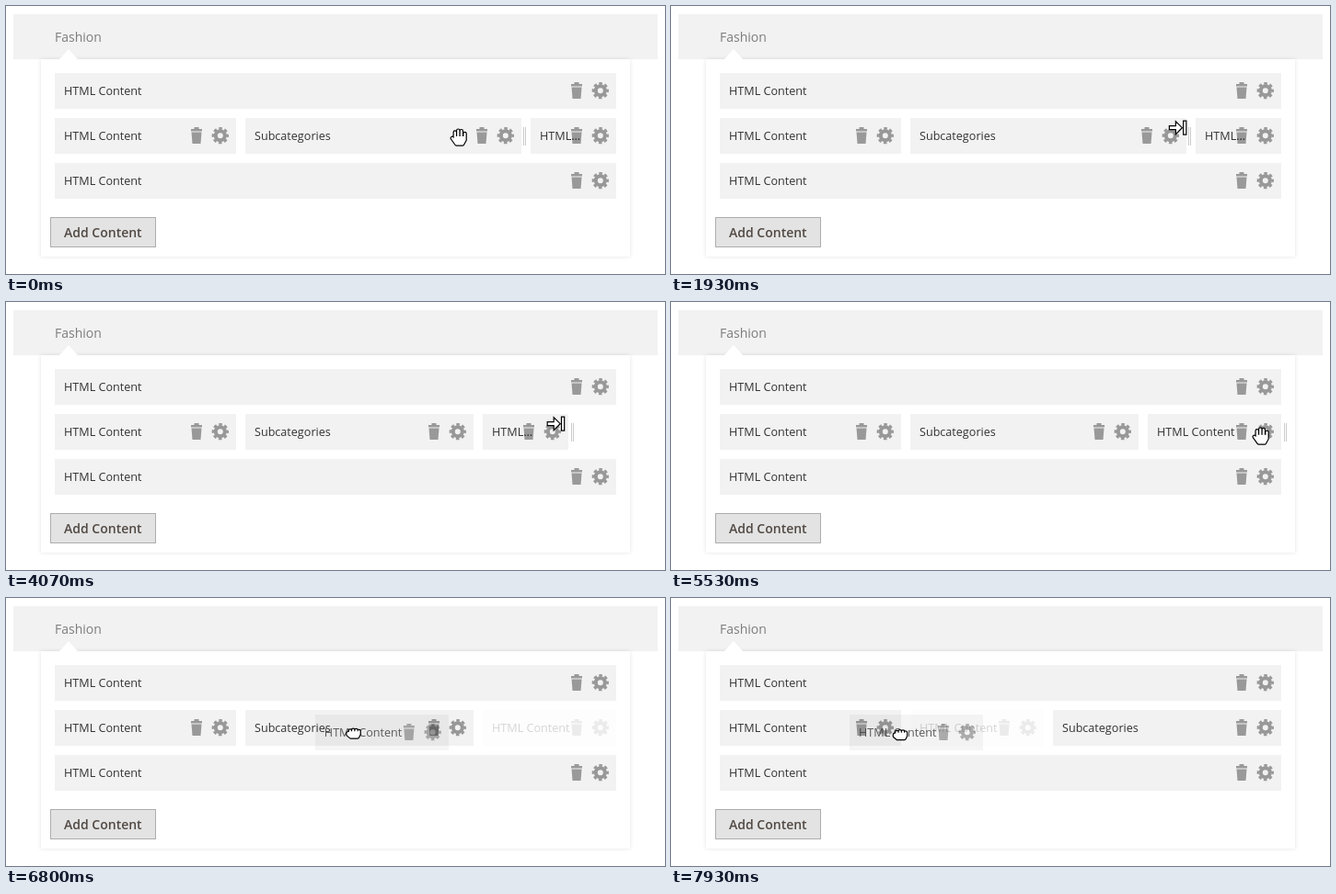
An HTML page that plays this animation: 716 px wide and 292 px high, repeating every 8000 ms.

```html
<!DOCTYPE html>
<html lang="en">
<head>
<meta charset="utf-8">
<title>Menu layout editor</title>
<style>
  html, body { margin: 0; width: 100%; height: 100%; overflow: hidden; background: #fff; }
  svg { display: block; }
  text { font: 12.6px "Open Sans", sans-serif; fill: #333; white-space: pre; }
  rect { shape-rendering: crispEdges; }
  .panel { fill: #fff; filter: drop-shadow(0 0 2px rgba(0, 0, 0, .11)); }
  .tab { font-size: 14px; fill: #7d7d7d; }
  .button { fill: #e3e3e3; stroke: #adadad; }
  .add { font-size: 14px; font-weight: 600; fill: #514943; }
  .box { fill: rgba(0, 0, 0, .05); }
  .icon { opacity: .37; }
  .ring { fill: none; stroke: #000; }
  .handle { stroke: #ccc; shape-rendering: crispEdges; }
  .helper { fill: none; stroke: #aaa; stroke-dasharray: 1 1; }
  .outer, .inner { stroke-linejoin: round; stroke-linecap: round; }
  .outer { fill: #000; stroke: #000; stroke-width: 4.6; }
  .inner { fill: #fff; stroke: #fff; stroke-width: 2.2; }
  .arrow { fill: #fff; stroke: #000; stroke-width: 1.2; }
</style>
</head>
<body>
<svg width="716" height="292">
  <defs>
    <path id="trash" d="M-2.5-9h5v2h3.5v2.5h-12v-2.5h3.5zM-5.5-3.5H5.5L4.5 9H-4.5z"/>
    <g id="gear" class="ring">
      <circle r="5" stroke-width="4"/>
      <circle r="7.75" stroke-width="2.8" stroke-dasharray="3.5 2.587" stroke-dashoffset="1.75"/>
    </g>
    <path id="open" d="M-4.2 0V-5.5M-.7 0V-7.3M2.8 0V-6.8M6.5 1V-4M-7.2 1L-5 4M-4.2 0H6.5V3L4 7.5H-2.5L-5 4z"/>
    <path id="closed" d="M-3.6-1V-2.8M-.3-1V-3.6M3-1V-3.3M6-1V-2.2M-3.6-1H6V1L4.5 4H-3L-6 1.5V0z"/>
    <path id="arrow" class="arrow" d="M-9.5-2H-2.5V-7L4.5 0L-2.5 7V2H-9.5zM5.8-7.5h3.2v15h-3.2z"/>
  </defs>
  <rect x="8" y="9" width="700" height="49" fill="#f2f2f2"/>
  <rect class="panel" x="38" y="58" width="640" height="215"/>
  <path d="M58 58L68 47L78 58z" fill="#fff"/>
  <text class="tab" x="53" y="39">Fashion</text>
  <rect class="button" x="48.5" y="230.5" width="114" height="32"/>
  <text class="add" x="63" y="252">Add Content</text>
  <g id="scene"></g>
</svg>
<script>
const scene = document.getElementById('scene');
const LOOP = 8000, FPS = 15, STEPS = LOOP / 1000 * FPS;
const ROWS = [73, 122, 171];
const HTML = 'HTML Content', SUB = 'Subcategories';

// Steps at which the layout or the cursor changes.
const GRAB_1 = 30, DROP_1 = 45, HOVER = 51, GRAB_2 = 69, DROP_2 = 79, DRAG = 92, SWAP = 118;
const EDGE_1 = 15, EDGE_2 = 61;

// Pointer moves: [first step, last step, x reached].
const MOVES = [
  [6, 16, 567], [28, 36, 522], [50, 62, 616], [68, 73, 667],
  [79, 83, 641], [83, 89, 573], [91, 104, 342], [104, 118, 249]
];

const within = (k, from, to) => k >= from && k < to;
const clamp = v => Math.max(0, Math.min(1, v));
const edge = col => 48 + col * 620 / 12;

const pointerX = k => MOVES.reduce((x, [from, to, goal]) => x + (goal - x) * clamp((k - from) / (to - from)), 492);
const pointerY = k => 143 + 6 * (k / STEPS) ** 2;

const use = (id, x, y, cls = '') => `<use href="#${id}" x="${x}" y="${y}" class="${cls}"/>`;

function box(label, left, right, y, opacity = 1) {
  return `<g opacity="${opacity}">
    <rect class="box" x="${left}" y="${y}" width="${right - left}" height="39"/>
    <text x="${left + 10}" y="${y + 24}">${label}</text>
    ${use('trash', right - 43, y + 19, 'icon')}${use('gear', right - 17.2, y + 19.2, 'icon')}</g>`;
}

// An item that fills grid columns from..to, less the gutter.
const item = (label, from, to, row = 1, opacity = 1) =>
  box(label, Math.round(edge(from) + 5), Math.round(edge(to) - 5), ROWS[row], opacity);

function middleRow(k) {
  const first = item(HTML, 0, 4);
  if (k >= SWAP) return first + item(HTML, 4, 7, 1, .2) + item(SUB, 7, 12);
  const split = k < DROP_1 ? 10 : 9;
  const end = within(k, DROP_1, DROP_2) ? 11 : 12;
  return first + item(SUB, 4, split) + item(end - split < 3 ? 'HTML…' : HTML, split, end, 1, k < DRAG ? 1 : .2);
}

function handle(k) {
  if (within(k, DROP_1, HOVER) || k >= DRAG) return '';
  const col = k < DROP_1 ? 10 : k < DROP_2 ? 11 : 12;
  return `<path class="handle" d="M${Math.floor(edge(col)) - 1.5} 132v20m2 0v-20"/>`;
}

function helper(k, x) {
  const col = within(k, GRAB_1, DROP_1) ? 4 : within(k, GRAB_2, DROP_2) ? 9 : 0;
  if (!col) return '';
  const left = Math.floor(edge(col)) + .5;
  return `<rect class="helper" x="${left}" y="117.5" width="${Math.round(x - 2 - left)}" height="48"/>`;
}

// The dragged copy trails the pointer slightly.
function ghost(k) {
  if (k < DRAG) return '';
  const left = pointerX(k - .75) - 55;
  return box(HTML, left, left + 145, ROWS[1] + 5 * clamp((k - DRAG) / 8), .8);
}

function cursor(k, x) {
  if (within(k, EDGE_1, DROP_1) || within(k, EDGE_2, DROP_2)) return use('arrow', x - 10.5, 132.7);
  const hand = k < DRAG ? 'open' : 'closed';
  return use(hand, x, pointerY(k), 'outer') + use(hand, x, pointerY(k), 'inner');
}

function draw(k) {
  const x = pointerX(k);
  scene.innerHTML = item(HTML, 0, 12, 0) + middleRow(k) + item(HTML, 0, 12, 2) +
    handle(k) + helper(k, x) + ghost(k) + cursor(k, x);
}

let last = -1;
const start = performance.now();
function tick() {
  const t = (performance.now() - start) % LOOP;
  const k = Math.min(STEPS - 1, Math.floor((t + 4) * FPS / 1000));
  if (k !== last) draw(last = k);
  requestAnimationFrame(tick);
}
tick();
</script>
</body>
</html>
```
